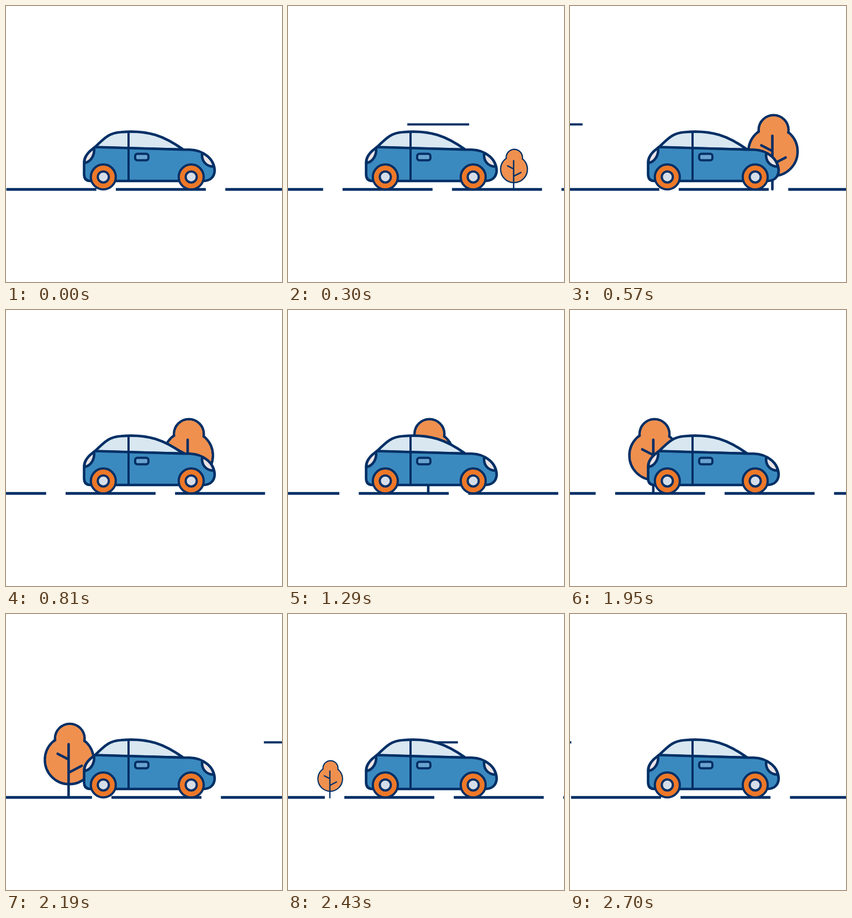
Animation of 500 by 500 pixels, one loop 2.73 s. Source, as an HTML page:

```html
<!DOCTYPE html>
<html lang="en">
<head>
<meta charset="utf-8">
<title>Car on the road</title>
<style>
  html, body { margin: 0; width: 100%; height: 100%; overflow: hidden; background: #fff; }
  svg { display: block; width: 100vw; height: 100vh; }
  .ink { stroke: #002f65; stroke-width: 4.6; stroke-linecap: round; stroke-linejoin: round; }
  .line { fill: none; }
  .blue { fill: #3b8abf; }
  .glass { fill: #d9e7f1; }
  .lamp { fill: #ebe3e4; }
  .leaf { fill: #f0904f; }
  .tyre { fill: #ee7828; }
  .hub { fill: #d5dde8; }
</style>
</head>
<body>
<svg viewBox="0 0 500 500">
  <g id="streaks" stroke="#002f65" stroke-width="4"></g>

  <g id="tree">
    <g class="ink leaf">
      <circle cx="1.2" cy="-70.5" r="44.5"/>
      <circle cx="2.2" cy="-109.3" r="27"/>
    </g>
    <g class="leaf">
      <circle cx="1.2" cy="-70.5" r="42.3"/>
      <circle cx="2.2" cy="-109.3" r="24.8"/>
    </g>
    <path class="ink line" d="M0-99V-2M-20-81.5L-.5-71.5M2-48L24-59.5"/>
  </g>

  <path id="road" d="M-198.3 332.2H800" fill="none" stroke="#002f65" stroke-width="5" stroke-dasharray="163 35.3"/>

  <g class="ink">
    <path class="glass" d="M161 256C180 237 189 229.5 208 228.5C258 224 287 236 321 260Z"/>
    <path class="blue" d="M161 255.5L323 260.3H333C358 261 378 278 378 299C377 310 370 317 357 317H153Q141.500 317 141.500 305V283C141.500 272 150 265 161 255.500Z"/>
    <path class="lamp" d="M159.500 257.500C161 270 154 282 142.500 284.500C140.500 274 150 263 159.500 257.500Z"/>
    <path class="lamp" d="M355.500 266.500C353.500 279 361 291 376.500 291C374.500 280 366 271 355.500 266.500Z"/>
    <path class="line" d="M222 228V316" stroke-width="4"/>
    <rect x="234" y="267.700" width="24" height="11.800" rx="4" fill="#6aa3d0" style="stroke-width:4"/>
  </g>
  <g id="wheels" class="ink" style="stroke-width:4"></g>
</svg>

<script>
const LOOP = 2730, STEP = 30, PERIOD = 198.3;
const $ = id => document.getElementById(id);

function add(parent, tag, attrs) {
  const el = document.createElementNS('http://www.w3.org/2000/svg', tag);
  for (const key in attrs) el.setAttribute(key, attrs[key]);
  return parent.appendChild(el);
}

for (const cx of [176.3, 335.5]) {
  add($('wheels'), 'circle', { cx, cy: 309.7, r: 22.6, class: 'tyre' });
  add($('wheels'), 'circle', { cx, cy: 309.7, r: 10, class: 'hub' });
}

// Speed streaks: height and the moment each enters on the right
const streaks = [[214.5, 49], [169.3, 1363.5], [232.6, 2161]].map(([y, start]) => ({
  start, el: add($('streaks'), 'path', { d: `M0 ${y}h112` })
}));

const place = (el, value) => el.setAttribute('transform', value);

function ease(t, from, to) {
  const u = Math.min(1, Math.max(0, (t - from) / (to - from)));
  return u * u * (3 - 2 * u);
}

function draw(t) {
  const shift = 0.3709 * (Math.max(t, STEP) - STEP);
  place($('road'), `translate(${199 - shift % PERIOD})`);

  const x = 366.6 - 0.1563 * (t - 570);
  const size = ease(t, 30, 540) * (1 - ease(t, 2160, 2700));
  place($('tree'), `translate(${x} 334) scale(${size})`);

  for (const { start, el } of streaks) {
    const left = 500 - 1.131 * (t - start);
    el.style.display = left < 500 && left > -112 ? '' : 'none';
    place(el, `translate(${left})`);
  }
}

const begin = performance.now();
function tick(now) {
  const t = Math.max(0, now - begin) % LOOP;
  draw(Math.floor(t / STEP) * STEP);
  requestAnimationFrame(tick);
}
draw(0);
requestAnimationFrame(tick);
</script>
</body>
</html>
```
